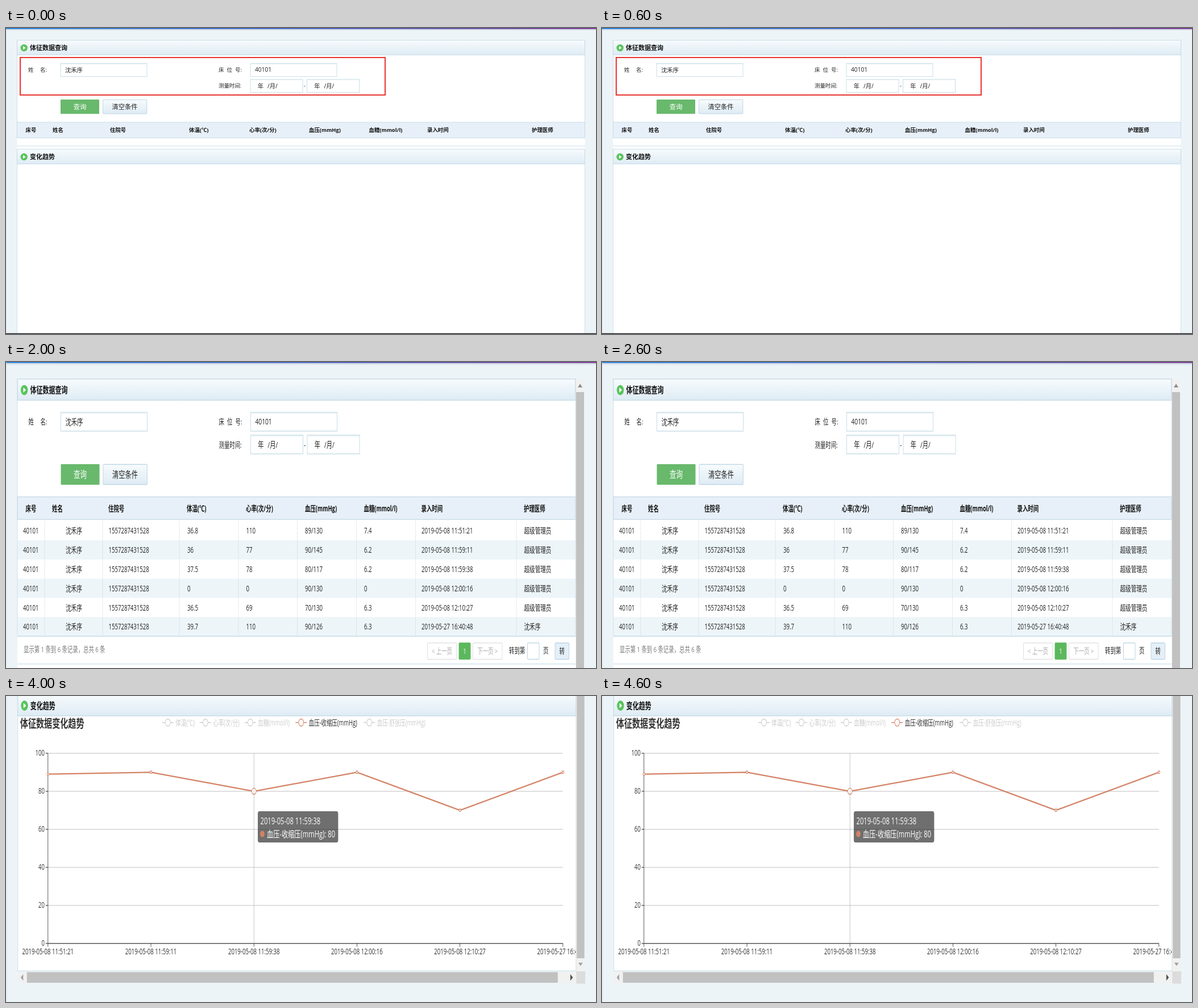
These frames come from a looping animation (1038 px wide and 539 px high, 5000 ms). An HTML page:

```html
<!DOCTYPE html>
<html lang="zh">
<head>
<meta charset="utf-8">
<title>体征数据查询</title>
<style>
  html, body { margin: 0; height: 100%; overflow: hidden; background: #edf4f8; }
  svg { display: block; width: 100vw; height: 100vh; }
  text { font-family: 'Open Sans', 'Noto Sans CJK SC', 'Noto Sans CJK', sans-serif; white-space: pre; }
</style>
</head>
<body>
<svg id="stage" viewBox="0 0 1038 539" preserveAspectRatio="none">
  <defs>
    <linearGradient id="bar"><stop stop-color="#2b86e0"/><stop offset=".5" stop-color="#4a68c4"/><stop offset="1" stop-color="#7d3f98"/></linearGradient>
    <linearGradient id="shade" x2="0" y2="1"><stop stop-color="#c9d3dc"/><stop offset="1" stop-color="#edf4f8"/></linearGradient>
    <linearGradient id="head" x2="0" y2="1"><stop stop-color="#f7fbfd"/><stop offset="1" stop-color="#deebf4"/></linearGradient>
    <clipPath id="panelClip"><rect x="20" y="-5" width="982" height="345"/></clipPath>
  </defs>
</svg>
<script>
const PATIENT = '沈禾序', ADMIN = '超级管理员', EDGE = '#c5dae5';
const COLORS = ['#c23531', '#2f4554', '#61a0a8', '#d48265', '#91c7ae'];
const NAMES = ['体温(℃)', '心率(次/分)', '血糖(mmol/l)', '血压-收缩压(mmHg)', '血压-舒张压(mmHg)'];
const HEADINGS = ['床号', '姓名', '住院号', '体温(℃)', '心率(次/分)', '血压(mmHg)', '血糖(mmol/l)', '录入时间', '护理医师'];

// temperature, heart rate, blood pressure, blood sugar, time, doctor
const RECORDS = [
  [36.8, 110, '89/130', 7.4, '2019-05-08 11:51:21', ADMIN],
  [36, 77, '90/145', 6.2, '2019-05-08 11:59:11', ADMIN],
  [37.5, 78, '80/117', 6.2, '2019-05-08 11:59:38', ADMIN],
  [0, 0, '90/130', 0, '2019-05-08 12:00:16', ADMIN],
  [36.5, 69, '70/130', 6.3, '2019-05-08 12:10:27', ADMIN],
  [39.7, 110, '90/126', 6.3, '2019-05-27 16:40:48', PATIENT]
];
const vitals = ([temp, heart, pressure, sugar]) => [temp, heart, sugar, ...pressure.split('/').map(Number)];

const rect = (x, y, w, h, fill, extra = '') =>
  `<rect x="${x}" y="${y}" width="${w}" height="${h}" fill="${fill}" ${extra}/>`;
const box = (x, y, w, h, fill, stroke = EDGE, extra = '') =>
  rect(x, y, w, h, fill, `stroke="${stroke}" stroke-width=".9" ${extra}`);
const line = (x1, y1, x2, y2, stroke, width = .8, extra = '') =>
  `<path d="M${x1} ${y1}L${x2} ${y2}" stroke="${stroke}" stroke-width="${width}" ${extra}/>`;
const circle = (x, y, r, fill, extra = '') => `<circle cx="${x}" cy="${y}" r="${r}" fill="${fill}" ${extra}/>`;
const shape = (points, fill) => `<polygon points="${points}" fill="${fill}"/>`;
// y is the vertical middle of the text
const text = (x, y, value, size = 9.4, fill = '#222', extra = '') =>
  `<text x="${x}" y="${y + size * .37}" font-size="${size}" fill="${fill}" ${extra}>${String(value).replace(/</g, '&lt;')}</text>`;
const BOLD = 'font-weight="700"', MIDDLE = 'text-anchor="middle"', END = 'text-anchor="end"';
const group = (matrix, content) => `<g transform="matrix(${matrix})">${content}</g>`;

const panelHead = (y, right, title) =>
  box(19.5, y, right - 19.5, 26, 'url(#head)') +
  circle(31.7, y + 13.5, 6.2, '#5ac35c') +
  shape(`30,${y + 10.3} 34.6,${y + 13.5} 30,${y + 16.7}`, '#fff') +
  text(42, y + 13.6, title, 11, '#111', BOLD);

const input = (x, y, w) => box(x, y, w, 23, '#fff', '#c3dbe4') + line(x + 1, y + 1, x + w - 1, y + 1, '#e6eff3', 1);
const dateInput = x => input(x, 90.3, 92) + text(x + 12.7, 102, '年', 10.3) + text(x + 30, 102, '/月/', 10.3);

function queryForm(right, columns) {
  return rect(0, 1.5, 1038, 3.5, 'url(#shade)') + rect(0, 0, 1038, 1.9, 'url(#bar)') +
    rect(0, 2, 1, 540, '#d9e6ee') +
    rect(19.5, 21.5, right - 19.5, 520, '#fff') + panelHead(21.5, right, '体征数据查询') +
    text(39, 74, '姓') + text(60, 74, '名:') + input(96, 62.4, 152) + text(104, 74, PATIENT, 10.3) +
    text(374, 74, '床') + text(388.5, 74, '位') + text(403, 74, '号:') +
    input(430, 62.4, 152) + text(438, 73.7, '40101', 10.2) +
    text(374, 102, '测量时间:') + dateInput(430) + text(523.7, 102, '-') + dateInput(529.5) +
    rect(96, 126, 68, 25.3, '#68b96c', 'rx="1"') + text(130, 138.7, '查询', 11.5, '#fff', MIDDLE) +
    box(170.4, 126.3, 77.4, 24.7, 'url(#head)', '#b9d3e1', 'rx="1"') + text(209, 138.7, '清空条件', 11.2, '#222', MIDDLE) +
    box(19.5, 166, right - 19.5, 27.7, '#e7f0f8') +
    HEADINGS.map((heading, i) => text(columns[i], 180, heading, 9.4, '#111', BOLD)).join('');
}

const emptyResult = queryForm(1018.5, [34.5, 82, 183, 322, 428, 533, 638.5, 741, 925]) +
  rect(19, 206.5, 1000, 2.5, '#e9f2f7') + panelHead(213.5, 1018.5, '变化趋势') +
  [19.5, 1018.5].map(x => line(x, 213, x, 545, EDGE)).join('') +
  line(19.5, 21, 19.5, 194, EDGE) + line(1018.5, 21, 1018.5, 194, EDGE);

function filledResult() {
  const top = 195.8, rowHeight = 23.54, right = 1001.5;
  const cellX = [29.5, 104.5, 180, 318.5, 422, 525.5, 629.5, 730.5, 911];
  let out = queryForm(right, [34, 80.5, 179.5, 317.5, 421.5, 525.5, 629, 730, 910.5]);
  RECORDS.forEach((record, row) => {
    const y = top + row * rowHeight;
    if (row % 2) out += rect(20, y, right - 20, rowHeight, '#edf5f9');
    ['40101', PATIENT, '1557287431528', ...record].forEach((value, i) => out += text(cellX[i], y + 11.9, value, 9.6));
  });
  const bottom = top + 6 * rowHeight;
  out += [67.5, 169.5, 304.5, 408.5, 512, 616, 720, 897.5]
    .map(x => line(x, 194, x, bottom, '#c4d0d6', .7, 'stroke-dasharray="1.5 1"')).join('');
  out += line(19.5, bottom, right, bottom, EDGE, 1) + line(19.5, 21, 19.5, bottom, EDGE) + line(right, 21, right, bottom, EDGE);

  const mid = 355.2, button = (x, w, label, fill, stroke, color) =>
    box(x, mid - 10, w, 20, fill, stroke, 'rx="1"') + text(x + w / 2, mid, label, 9.4, color, MIDDLE);
  out += text(30.5, 352.7, '显示第 1 条到 6 条记录，总共 6 条', 9.4, '#777') +
    button(741, 51, '< 上一页', '#fff', '#ddd', '#aaa') + button(796.5, 20, '1', '#5cb85c', '#5cb85c', '#fff') +
    button(821, 51.5, '下一页 >', '#fff', '#ddd', '#aaa') + text(884.5, mid - .6, '转到第') +
    button(917, 20.5, '', '#fff', '#b5d0e2') + text(944.5, mid - .6, '页') + button(965.5, 24.5, '转', '#e4eff8', '#b5d0e2', '#222');
  return out + rect(19.5, 370, right - 19.5, 2, '#e6eff4') +
    rect(1002.5, 21.5, 14, 360, '#f1f1f1') + rect(1002.5, 37.5, 14, 350, '#c1c1c1') +
    shape('1005.5,31.8 1013.5,31.8 1009.5,27.3', '#8a8a8a');
}

function tooltip(x, y, width, items) {
  const time = RECORDS[2][4], values = vitals(RECORDS[2]);
  return rect(x, y, width, 22.4 + 15.8 * items.length, '#323232', 'fill-opacity=".7" rx="3"') +
    text(x + 4.5, y + 11.9, time, 11.2, '#fff') +
    items.map((s, i) => {
      const rowY = y + 11.9 + 15.8 * (i + 1);
      return circle(x + 8, rowY, 3.9, COLORS[s]) + text(x + 16, rowY, `${NAMES[s]}: ${values[s]}`, 11.2, '#fff');
    }).join('');
}

function chart(max, step, shown, tip) {
  const left = 73, right = 979, top = 70, base = 302.2;
  const xAt = i => left + (right - left) * i / 5, yAt = v => base - (base - top) * v / max;
  let out = rect(0, -5, 1, 400, '#d9e6ee') + rect(20, -5, 982, 341, '#fff') + panelHead(-1.6, 1002, '变化趋势') +
    text(24, 33.5, '体征数据变化趋势', 14.1, '#333', BOLD);

  [274, 340, 419, 508.5, 628.5].forEach((x, s) => {
    const on = shown.includes(s), color = on ? COLORS[s] : '#ccc';
    out += line(x, 32.5, x + 20, 32.5, color, 1) + circle(x + 10, 32.5, 4.4, '#fff', `stroke="${color}" stroke-width=".9"`) +
      text(x + 23.5, 32.4, NAMES[s], 9.4, on ? '#333' : '#ccc');
  });

  for (let v = 0; v <= max; v += step) {
    const y = yAt(v);
    if (v) out += line(left, y, right, y, '#ccc');
    out += line(left - 4, y, left, y, '#333') + text(67, y - .4, v, 9.4, '#333', END);
  }
  out += line(left, top, left, base, '#333') + line(left, base, right, base, '#333');
  let labels = '';
  RECORDS.forEach((record, i) => {
    out += line(xAt(i), base, xAt(i), base + 4, '#333');
    labels += text(xAt(i), 312, record[4], 9.6, '#333', MIDDLE);
  });
  out += `<g clip-path="url(#panelClip)">${labels}</g>`;

  const totals = RECORDS.map(() => 0);
  for (const s of shown) {
    RECORDS.forEach((record, i) => totals[i] += vitals(record)[s]);
    const points = totals.map((v, i) => [xAt(i), yAt(v)]);
    out += `<polyline points="${points.join(' ')}" fill="none" stroke="${COLORS[s]}" stroke-width="1.6" stroke-linejoin="bevel"/>` +
      points.map(([x, y], i) => circle(x, y, i === 2 ? 3.9 : 1.6, '#fff', `stroke="${COLORS[s]}" stroke-width=".9"`)).join('');
  }
  out += line(xAt(2), top, xAt(2), base, '#aaa', .8, 'opacity=".8"') + tooltip(...tip, shown);

  return out + line(20, -5, 20, 336, EDGE) + line(1002, -5, 1002, 336, EDGE) + line(20, 335.7, 1002, 335.7, EDGE) +
    rect(1003, -5, 14.3, 341, '#f1f1f1') + rect(1003.5, -5, 13.3, 325.3, '#c1c1c1') +
    shape('1006,325.6 1014,325.6 1010,329.6', '#a3a3a3') +
    rect(20, 336.7, 982, 14, '#f1f1f1') + rect(36, 337.2, 934, 13, '#c1c1c1') +
    shape('29.5,339.7 29.5,347.7 25,343.7', '#a3a3a3') + shape('992,339.7 992,347.7 996.5,343.7', '#505050') +
    rect(1002.5, 336.2, 15.8, 15, '#dcdcdc');
}

const highlight = (x, y, w, h) => rect(x, y, w, h, 'none', 'stroke="#e6352f" stroke-width="2"');
const bottomEdge = rect(0, 537.7, 1038, 1.3, '#15181c');

const scenes = [
  emptyResult + highlight(25, 52, 642, 66) + bottomEdge,
  group('.995 0 0 1.005 2.1 -1.1', emptyResult) + highlight(87, 119.7, 82, 38.3) + rect(1036, 0, 2, 397, '#bdbfc3'),
  group('1 0 0 1.436 .5 -.9', filledResult()),
  group('1 0 0 1.436 0 0', chart(400, 100, [0, 1, 2, 3, 4], [458, 108.6, 148])) + bottomEdge,
  group('1 0 0 1.443 .8 -.2', chart(100, 20, [3], [442.2, 140.8, 141.4]))
];

const stage = document.getElementById('stage');
stage.insertAdjacentHTML('beforeend', scenes.map(scene => `<g class="scene" display="none">${scene}</g>`).join(''));
const layers = [...stage.querySelectorAll('.scene')];

function render() {
  const current = Math.floor(performance.now() % 5000 / 1000);
  layers.forEach((layer, i) => layer.setAttribute('display', i === current ? 'inline' : 'none'));
  requestAnimationFrame(render);
}
render();
</script>
</body>
</html>
```
